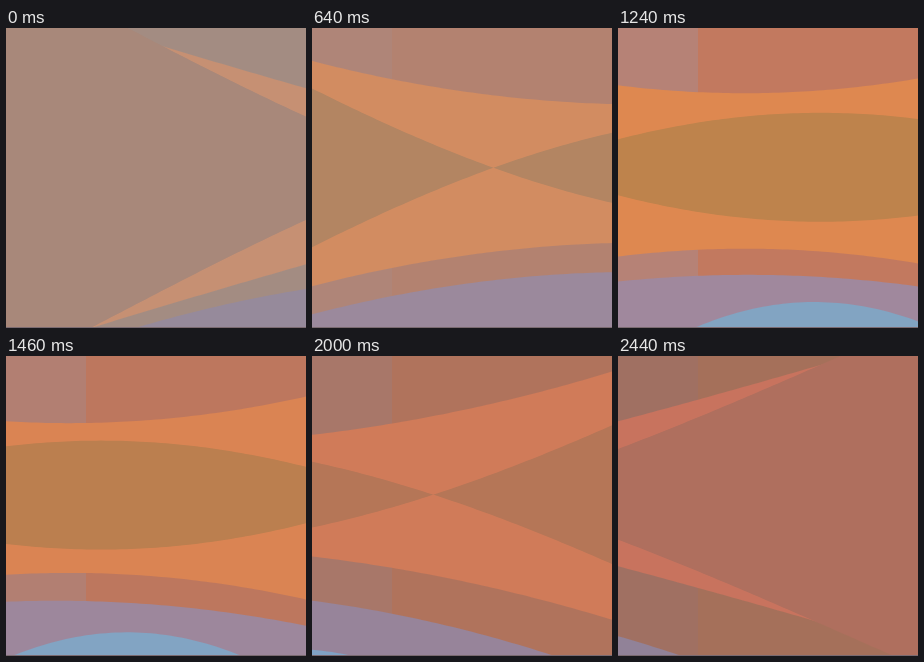
An HTML page with a canvas that plays this animation: 300 by 300 pixels, repeating every 2460 ms.

```html
<!DOCTYPE html>
<html lang="en">
<head>
<meta charset="utf-8">
<title>Drifting waves</title>
<style>
  html, body { margin: 0; width: 100%; height: 100%; overflow: hidden; }
  canvas { display: block; width: 100%; height: 100%; }
</style>
</head>
<body>
<canvas id="stage" width="300" height="300"></canvas>
<script>
const ctx = document.getElementById('stage').getContext('2d');
const SIZE = 300, LOOP = 2460, STEP = 20;

// Colour at the start, the middle and the end of the loop.
const COLORS = {
  sky: ['#a38c82', '#c2795f', '#a5705a'],
  strip: ['#a8887a', '#b68276', '#a07062'],
  hill: ['#968a9b', '#a0889d', '#918298'],
  pool: ['#80a2c6', '#82a4c2', '#80a2c6'],
  band: ['#c69073', '#de8850', '#c8735e'],
  lens: ['#a8887a', '#be834c', '#af6f5e']
};

// Polynomial with coefficients in rising order.
const poly = (u, ...terms) => terms.reduceRight((sum, k) => sum * u + k, 0);

function color(name, u) {
  const [start, middle, end] = COLORS[name];
  const edge = u < 0 ? start : end;
  const channel = (hex, at) => parseInt(hex.slice(at, at + 2), 16);
  const rgb = [1, 3, 5].map(at => {
    const from = channel(middle, at);
    return Math.round(from + (channel(edge, at) - from) * Math.abs(u));
  });
  return `rgb(${rgb.join()})`;
}

// Fills the area between two curves y(x).
function fillBetween(top, bottom, fill) {
  ctx.fillStyle = fill;
  ctx.beginPath();
  for (let x = 0; x <= SIZE; x += 5) ctx.lineTo(x, top(x));
  for (let x = SIZE; x >= 0; x -= 5) ctx.lineTo(x, bottom(x));
  ctx.fill();
}

const fillMirrored = (center, half, fill) =>
  fillBetween(x => center - half(x), x => center + half(x), fill);

// A parabola across the stage: height, tilt and bend about the middle.
const arc = (height, tilt, bend) => x => poly(x / 150 - 1, height, tilt, bend);

// u runs from -1 to 1 over one loop.
function draw(u) {
  const floor = () => SIZE;

  const hill = arc(poly(u, 247, 0, 45, 21, 23), poly(u, 2, 52, 8), 9);

  const poolX = poly(u, 200, -450, 150);
  const poolY = poly(u, 274, 5, 40);
  const pool = x => Math.min(SIZE, poolY + 0.0018 * (x - poolX) ** 2);

  const band = arc(poly(u, 78, 1, 8, -9, 38), poly(u, 3, 51, -4, -7), poly(u, 11, 0, -10));

  // The lens is a cosine wave whose phase drifts and stretches.
  const phase = poly(u, 0.145, -1.49, -0.11, 0.08);
  const stretch = poly(u, 0.38, -0.03, -0.03);
  const lens = x => 206 * Math.cos(phase - stretch * (x / 150 - 1)) - 151.5;

  ctx.fillStyle = color('sky', u);
  ctx.fillRect(0, 0, SIZE, SIZE);
  ctx.fillStyle = color('strip', u);
  ctx.fillRect(0, 0, 80, SIZE);
  fillBetween(x => Math.min(SIZE, hill(x)), floor, color('hill', u));
  fillBetween(pool, floor, color('pool', u));
  fillMirrored(143 - 5.3 * u, band, color('band', u));
  fillMirrored(139.3 - u, lens, color('lens', u));
  ctx.fillStyle = '#7a6a70';
  ctx.fillRect(0, SIZE - 1, SIZE, 1);
}

function tick() {
  const t = Math.floor(performance.now() % LOOP / STEP) * STEP;
  draw(2 * t / LOOP - 1);
  requestAnimationFrame(tick);
}
tick();
</script>
</body>
</html>
```
